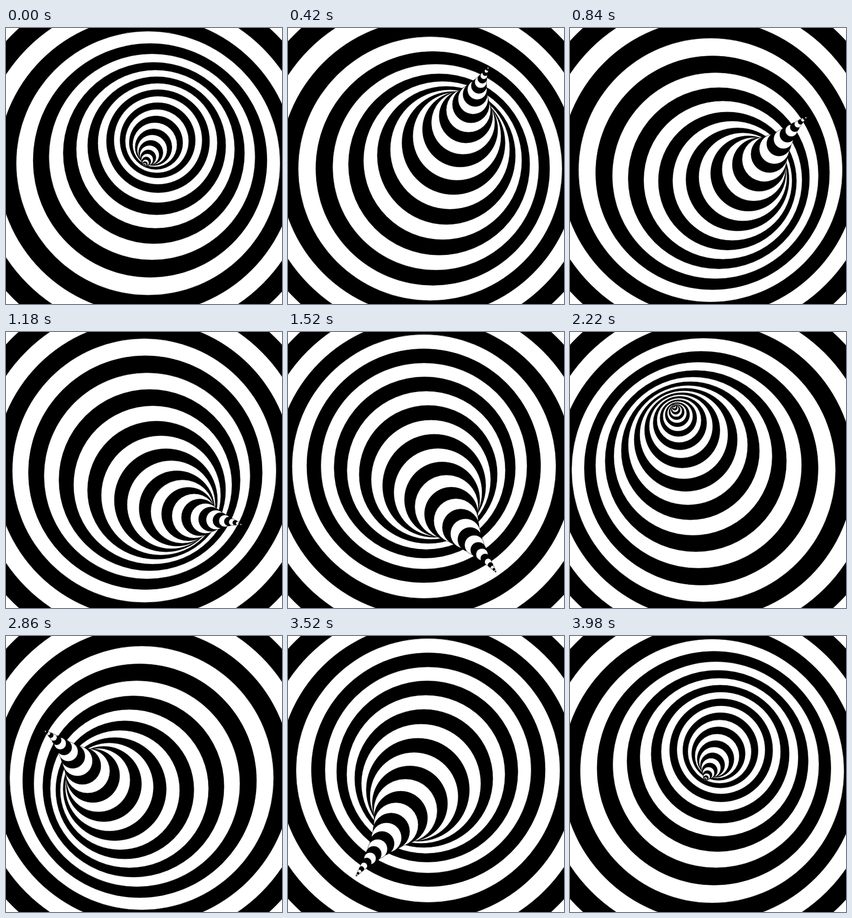
Recreate the animation shown at these times as an HTML page with a canvas. Size 500 by 500 pixels, loop 4 s.

```html
<!DOCTYPE html>
<html lang="en">
<head>
<meta charset="utf-8">
<title>Striped tunnel</title>
<style>
  html, body { margin: 0; width: 100%; height: 100%; overflow: hidden; background: #fff; }
  canvas { display: block; width: 500px; height: 500px; }
</style>
</head>
<body>
<canvas id="stage" width="500" height="500"></canvas>
<script>
  const ctx = document.getElementById('stage').getContext('2d');
  const LOOP = 4000;
  const TAU = Math.PI * 2;
  const MID = 250;
  const RINGS = 30;
  const WIDEST = 376;
  const SWING = 185;     // reach of the innermost ring
  const LEAD = 0.3;      // turns by which the widest ring runs ahead

  // Rings shrink towards the tip, swing wider and lag further behind.
  function ring(i, turn) {
    const depth = i / RINGS;
    const radius = WIDEST * (1 - i / 37.4) ** 4;
    const swing = SWING * (1 - Math.cos(Math.PI * depth)) / 2;
    const angle = TAU * (turn + LEAD * (1 - depth) ** 3);
    return {
      x: MID + swing * Math.sin(angle),
      y: MID - swing * Math.sin(2 * angle),
      radius
    };
  }

  function draw(now) {
    const turn = (now % LOOP) / LOOP;
    ctx.fillStyle = '#fff';
    ctx.fillRect(0, 0, 500, 500);
    ctx.strokeStyle = '#000';
    ctx.lineWidth = 0.6;
    for (let i = 0; i <= RINGS; i++) {
      const { x, y, radius } = ring(i, turn);
      ctx.beginPath();
      ctx.arc(x, y, radius, 0, TAU);
      ctx.fillStyle = i % 2 ? '#000' : '#fff';
      ctx.fill();
      ctx.stroke();
    }
  }

  const start = performance.now();
  function tick() {
    draw(performance.now() - start);
    requestAnimationFrame(tick);
  }
  tick();
</script>
</body>
</html>
```
